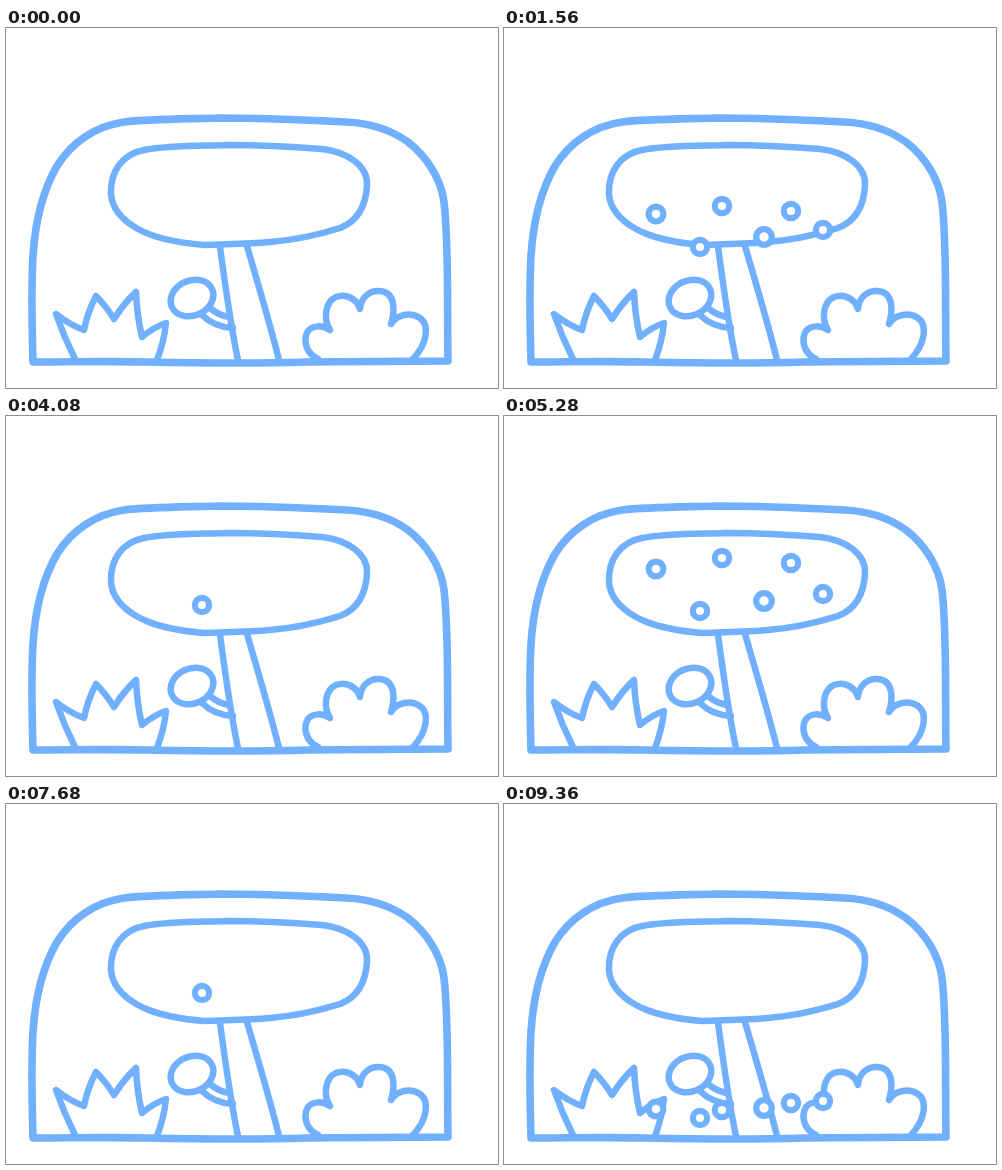
An HTML page for the animation above (9480 ms loop, 492 by 360 pixels).

```html
<!DOCTYPE html>
<html lang="en">
<head>
<meta charset="utf-8">
<title>Apple tree</title>
<style>
html, body { margin: 0; width: 100%; height: 100%; overflow: hidden; background: #fff; }
svg { display: block; width: 492px; height: 360px; }
g { fill: none; stroke: #70b0fe; stroke-width: 6.5; stroke-linecap: round; stroke-linejoin: round; }
#apples { fill: #fff; stroke-width: 6.2; }
</style>
</head>
<body>
<svg viewBox="0 0 492 360">
  <g>
    <path stroke-width="7.6" d="M27 334C26 300 25 262 27 228C29 196 36 164 51 138C66 114 90 98 118 94C142 91 180 91 212 90C254 90 300 92 340 94C364 95 384 101 402 114C420 128 435 150 438 174C443 214 441 280 442 333C400 333 350 334 300 334C240 336 190 335 140 334C100 333 65 334 27 334Z"/>
    <path d="M105 166C104 144 116 126 138 122C164 117 195 118 222 117C256 117 290 119 316 121C342 124 362 138 361 157C360 178 352 193 334 200C312 207 290 212 264 214C240 216 220 216 198 217C174 215 148 210 132 201C116 192 106 181 105 166Z"/>
    <path d="M214 219C219 255 224 295 232 332M241 218C252 256 263 292 273 332"/>
    <ellipse cx="186" cy="270" rx="22" ry="17.5" transform="rotate(-24 186 270)"/>
    <path d="M196 287Q208 299 227 300M204 280Q212 287 223 289"/>
    <path d="M69 331Q58 309 50 286Q64 297 78 302Q82 283 90 268Q100 278 108 291Q118 275 130 264Q131 288 136 309Q148 299 160 295Q158 314 151 332"/>
    <path d="M312 331C299 325 297 311 302 303C307 297 316 297 324 302C317 291 319 274 330 269C340 265 351 271 354 281C355 269 364 262 374 263C388 264 390 280 385 296C391 286 405 284 414 290C424 297 421 316 407 331"/>
  </g>
  <g id="apples"></g>
</svg>
<script>
const LOOP = 9480, STEP = 120, STARTS = [120, 4080, 7680];
const FALL = 10, CLEAR = 20; // steps after a start

// x, radius, step of appearance, lift while hanging, then four heights on the way down
const apples = [
  [152, 7.4, 1, 0, 153, 186, 305, 328],
  [218, 7.2, 2, 0, 142, 178, 306, 328],
  [287, 7.2, 1, 0, 147, 183, 299, 328],
  [196, 7.1, 0, 6, 195, 219, 314, 328],
  [260, 7.8, 2, 6, 185, 209, 304, 326],
  [319, 7.1, 3, 6, 178, 202, 297, 328]
].map(([x, r, pop, lift, a, b, c, d]) => {
  const el = document.createElementNS("http://www.w3.org/2000/svg", "circle");
  el.setAttribute("cx", x);
  el.setAttribute("r", r);
  document.getElementById("apples").append(el);
  const mix = (from, to, f) => from + (to - from) * f;
  return { el, pop, path: [a - lift, a, mix(a, b, .38), b, mix(b, c, .42), c, d] };
});

function draw() {
  const t = performance.now() % LOOP;
  const start = STARTS.filter(s => s <= t).pop() ?? LOOP;
  const n = Math.floor((t - start) / STEP);
  const pose = Math.max(0, Math.min(6, n - FALL + 1));
  for (const { el, pop, path } of apples) {
    el.setAttribute("cy", path[pose]);
    el.style.display = n >= pop && n < CLEAR ? "" : "none";
  }
  requestAnimationFrame(draw);
}
draw();
</script>
</body>
</html>
```
